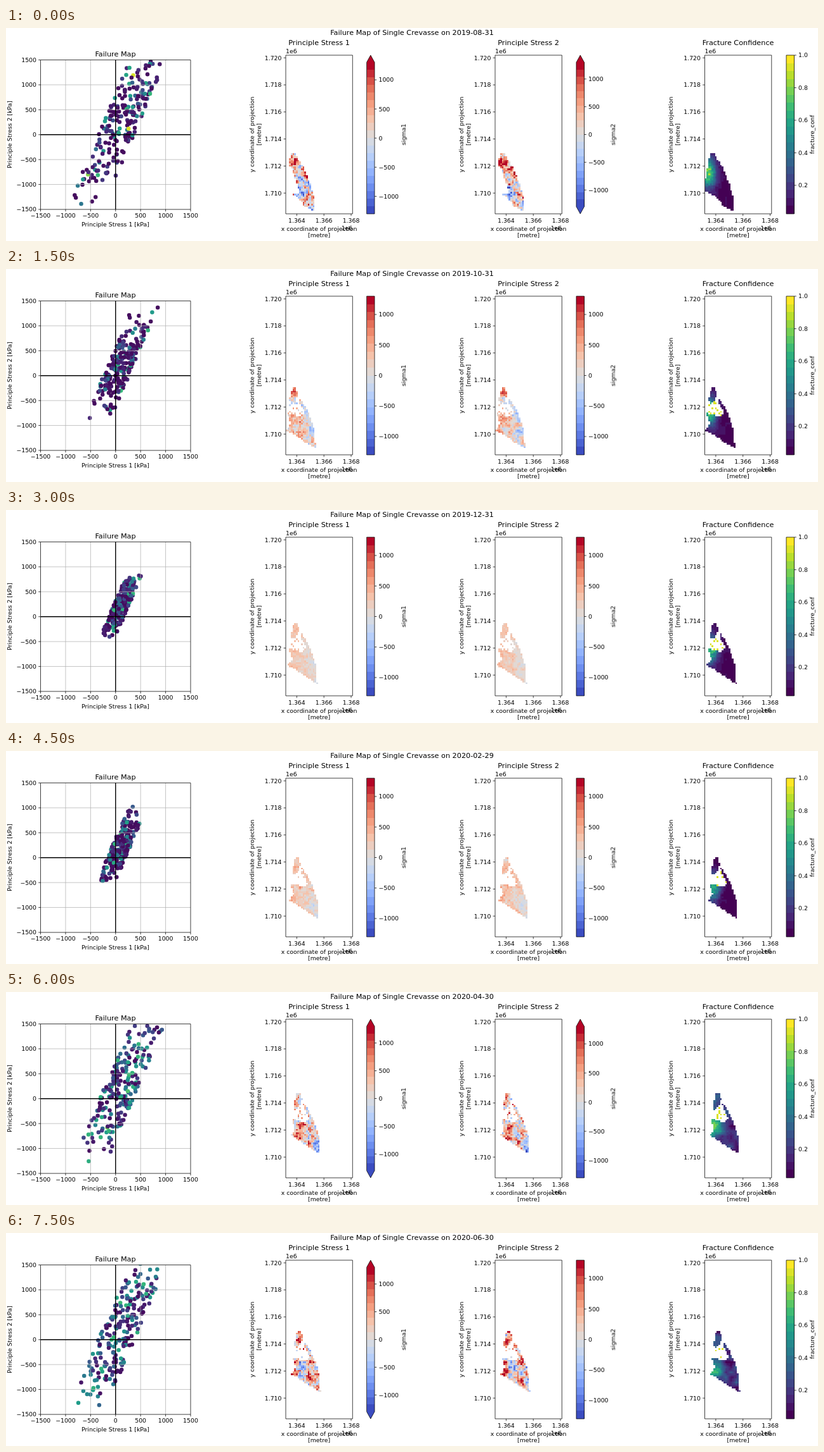
These frames come from a looping animation (1280x337 px, 8000 ms). An HTML page:

```html
<!DOCTYPE html>
<html lang="en">
<head>
<meta charset="utf-8">
<title>Failure map</title>
<style>
  html, body { margin: 0; width: 100%; height: 100%; overflow: hidden; background: #fff; }
  svg { display: block; width: 1280px; height: 337px; font: 9.33px "DejaVu Sans", sans-serif; }
  .title { font-size: 11.22px; }
  .line { fill: none; stroke: #000; stroke-width: .75; }
  .grid { stroke: #b0b0b0; stroke-width: .75; }
  .zero { stroke: #000; stroke-width: 1.4; }
  .cells { shape-rendering: crispEdges; }
  .month { opacity: 0; animation: show 8s step-end infinite; }
  .month:last-child { animation-name: showLast; }
  @keyframes show { 0% { opacity: 1; } 9.375%, 100% { opacity: 0; } }
  @keyframes showLast { 0% { opacity: 1; } 6.25%, 100% { opacity: 0; } }
</style>
</head>
<body>
<svg viewBox="0 0 1280 337">
  <defs><clipPath id="plot"><rect x="54.5" y="50.5" width="236.5" height="236.5"/></clipPath></defs>
  <g id="months"></g>
  <g id="axes"></g>
</svg>
<script>
const COOLWARM = ['3b4cc0', '6282ea', '8db0fe', 'b8d0f9', 'dddddd', 'f5c4ad', 'f49a7b', 'de604d', 'b40426'];
const VIRIDIS = ['440154', '482878', '3e4989', '31688e', '26828e', '1f9e89', '35b779', '6ece58', 'b5de2b', 'fde725'];
const TOP = 43, BOTTOM = 294, LIMIT = 1300, CONF_MIN = .025, CELL = 2.67, LEVELS = 20;
const PANELS = [441, 771, 1101.5];

const clamp = (v, lo = 0, hi = 1) => Math.min(hi, Math.max(lo, v));
const mix = (a, b, t) => a + (b - a) * t;
const minus = v => String(v).replace('-', '−');

function ramp(stops, t) {
  const p = clamp(t) * (stops.length - 1), i = Math.min(stops.length - 2, Math.floor(p));
  const channel = (hex, c) => parseInt(hex.substr(c * 2, 2), 16);
  return `rgb(${[0, 1, 2].map(c => Math.round(mix(channel(stops[i], c), channel(stops[i + 1], c), p - i)))})`;
}
const stepped = (stops, t) => ramp(stops, clamp(Math.floor(t * LEVELS), 0, LEVELS - 1) / (LEVELS - 1));

// Drawing helpers
const text = (s, x, y, anchor = 'middle', extra = '') =>
  `<text x="${x}" y="${y}" text-anchor="${anchor}" ${extra}>${s}</text>`;
const title = (s, x, y) => text(s, x, y, 'middle', 'class="title"');
const upright = (s, x, y = 168.5) => text(s, 0, 0, 'middle', `transform="translate(${x} ${y}) rotate(-90)"`);
const path = (d, cls = 'line') => `<path class="${cls}" d="${d}"/>`;
const rect = (x, y, w, h, fill) =>
  `<rect x="${x.toFixed(2)}" y="${y.toFixed(2)}" width="${w.toFixed(2)}" height="${h.toFixed(2)}" fill="${fill}"/>`;
const frame = (x, y, w, h) => path(`M${x} ${y}h${w}v${h}h${-w}z`);

// Seeded noise
const hash = (x, y, seed) => {
  const s = Math.sin(x * 127.1 + y * 311.7 + seed * 74.7) * 43758.5453;
  return s - Math.floor(s);
};
function smooth(x, y, seed) {
  const i = Math.floor(x), j = Math.floor(y), u = x - i, v = y - j;
  return 2 * mix(mix(hash(i, j, seed), hash(i + 1, j, seed), u),
                 mix(hash(i, j + 1, seed), hash(i + 1, j + 1, seed), u), v) - 1;
}

// Ice outlines relative to its top, as x, y pairs
const WHOLE = [0,0, 6,0, 13,13, 21,25, 30,48, 37,70, 38,92, 24,87, 8,69, -8,61, -8,48, -3,18];
const LUMP = [0,0, 6,0, 9,10, 4,22, -3,27, -4,18];
const BODY = [10,14, 20,28, 28,45, 35,68, 37,96, 20,86, 0,72, -10,67, -2,57, -8,40, 14,46, 20,39, 12,25];
const GAP = [4,10, 12,24, 20,38, 14,46, -8,40, -3,18];

function inside(poly, x, y) {
  let hit = false;
  for (let i = 0, j = poly.length - 2; i < poly.length; j = i, i += 2) {
    const [ax, ay, bx, by] = [poly[i], poly[i + 1], poly[j], poly[j + 1]];
    if ((ay > y) !== (by > y) && x < ax + (bx - ax) * (y - ay) / (by - ay)) hit = !hit;
  }
  return hit;
}

// Stress is calm in midwinter and strong in summer; the ice drifts upwards.
function monthState(i) {
  return {
    i,
    active: Math.min(1, .2 + .06 * (i - 4.6) ** 2),
    late: clamp((i - 6) / 2),
    x: Math.min(459, 449 + 1.15 * i),
    y: Math.max(156, 197 - 4.6 * i)
  };
}

function scatter({ i, active, late }) {
  let out = '';
  for (let n = 0; n < 225; n++) {
    const r = k => hash(n, k, i);
    const y = 230 + (380 + 1300 * active) * (r(1) + r(5) - 1);
    const x = 15 + .42 * y + (100 + 260 * active) * (2 * r(2) - 1);
    const conf = .03 + .65 * r(3) ** mix(4.5, 1.8, late) + (r(4) > .985 ? .4 : 0);
    out += `<circle cx="${(172.75 + x * .07883).toFixed(1)}" cy="${(168.75 - y * .07883).toFixed(1)}" r="3.25" fill="${ramp(VIRIDIS, conf)}"/>`;
  }
  return `<g clip-path="url(#plot)">${out}</g>`;
}

function stressColor({ i, active }, panel, x, y, u) {
  const wave = .9 * smooth(x / 2.6, y / 2.6, i + 20) + .45 * smooth(x / 2, y / 2, i + 30 + panel * 9);
  const grain = .5 * (2 * hash(x, y, i + 40 + panel) - 1);
  const sigma = 220 + 150 * (13 - u) / 20 + 1150 * active ** 1.2 * (wave + grain);
  return stepped(COOLWARM, (sigma + LIMIT) / (2 * LIMIT));
}

function confColor({ i, late }, x, y, u, v, loose) {
  const d = ((u + 2) / 11) ** 2 + ((v - 32 - 2.4 * i) / 22) ** 2;
  const rest = mix(.05, .2, late) * (1 + .9 * smooth(x / 3, y / 3, i + 60));
  const conf = loose ? .95 : rest + mix(.78, .4, i / 10) * Math.exp(-d) * (.85 + .3 * hash(x, y, i + 70));
  return stepped(VIRIDIS, (conf - CONF_MIN) / (1 - CONF_MIN));
}

function heatmaps(m) {
  let out = '';
  for (let x = 0; x < 24; x++) for (let y = 40; y < 94; y++) {
    const u = (x + .5) * CELL + PANELS[0] - m.x, v = (y + .5) * CELL + TOP - m.y;
    const solid = m.i ? inside(LUMP, u, v) || inside(BODY, u, v) : inside(WHOLE, u, v);
    const loose = !solid && m.i > 0 && inside(GAP, u, v) && hash(x, y, m.i + 5) > .88;
    if (!solid && !loose) continue;
    // At first the western flank has confidence but no stress.
    const bare = m.i === 0 && v > 22 && v < 66 && u < (v - 20) * .33;
    PANELS.forEach((left, panel) => {
      if (panel < 2 && bare) return;
      const fill = panel < 2 ? stressColor(m, panel, x, y, u) : confColor(m, x, y, u, v, loose);
      out += rect(left + x * CELL, TOP + y * CELL, CELL, CELL, fill);
    });
  }
  return `<g class="cells">${out}</g>`;
}

function colorbar(x, stops, lo, hi, ticks, extend = '') {
  const w = 12.5, up = /max|both/.test(extend), down = /min|both/.test(extend);
  const top = TOP + (up ? 11.4 : 0), bottom = BOTTOM - (down ? 11.4 : 0), h = (bottom - top) / LEVELS;
  let out = '<g class="cells">';
  for (let n = 0; n < LEVELS; n++) out += rect(x, bottom - (n + 1) * h, w, h, ramp(stops, n / (LEVELS - 1)));
  out += '</g>';
  const tip = (base, end, color) => `<path d="M${x} ${base}L${x + w / 2} ${end}L${x + w} ${base}z" fill="${color}"/>`;
  if (up) out += tip(top, TOP, ramp(stops, 1));
  if (down) out += tip(bottom, BOTTOM, ramp(stops, 0));
  out += path(`M${x} ${bottom}V${top}${up ? `L${x + w / 2} ${TOP}` : ''}L${x + w} ${top}V${bottom}` +
              `${down ? `L${x + w / 2} ${BOTTOM}` : ''}z`);
  for (const t of ticks) {
    const y = mix(bottom, top, (t - lo) / (hi - lo));
    out += path(`M${x + w} ${y}h3.3`) + text(minus(hi === 1 ? t.toFixed(1) : t), x + w + 6.5, y + 3.4, 'start');
  }
  return out;
}

// Colour bars with arrow ends, by month
const EXTENDS = { 0: ['max', 'both'], 8: ['both', 'max'], 9: ['min'], 10: ['both'] };

function month(i) {
  const m = monthState(i), [ext1, ext2] = EXTENDS[i] || [];
  const date = new Date(Date.UTC(2019, 8 + i, 0)).toISOString().slice(0, 10);
  const stress = [-1000, -500, 0, 500, 1000];
  return `<g class="month" style="animation-delay:${i * 750 - 8000}ms">` +
    title(`Failure Map of Single Crevasse on ${date}`, 640, 10.8) +
    scatter(m) + heatmaps(m) +
    colorbar(568.5, COOLWARM, -LIMIT, LIMIT, stress, ext1) +
    colorbar(899, COOLWARM, -LIMIT, LIMIT, stress, ext2) +
    colorbar(1230, VIRIDIS, CONF_MIN, 1, [.2, .4, .6, .8, 1]) + '</g>';
}

function scatterAxes() {
  let out = '';
  for (let v = -1500; v <= 1500; v += 500) {
    const x = 172.75 + v * .07883, y = 168.75 - v * .07883;
    if (v && Math.abs(v) < 1500) out += path(`M${x} 50.5V287M54.5 ${y}H291`, 'grid');
    out += path(`M${x} 287v3.3M54.5 ${y}h-3.3`) +
      text(minus(v), x, 300.4) + text(minus(v), 48, y + 3.4, 'end');
  }
  return out + path('M172.75 50.5V287M54.5 168.75H291', 'zero') + frame(54.5, 50.5, 236.5, 236.5) +
    title('Failure Map', 172.5, 45) +
    text('Principle Stress 1 [kPa]', 172.5, 313.6) + upright('Principle Stress 2 [kPa]', 9.3);
}

function mapAxes(left, name) {
  let out = frame(left, TOP, 105.3, BOTTOM - TOP);
  for (let n = 0; n < 3; n++) {
    const x = left + 17.4 + n * 42.8;
    out += path(`M${x} ${BOTTOM}v3.3`) + text((1.364 + n * .002).toFixed(3), x, 307.5);
  }
  for (let n = 0; n < 6; n++) {
    const y = 47.2 + n * 42.8;
    out += path(`M${left} ${y}h-3.3`) + text((1.72 - n * .002).toFixed(3), left - 6.5, y + 3.4, 'end');
  }
  const mid = left + 52.6;
  return out + title(name, mid, 27) + text('1e6', left, 39.8, 'start') + text('1e6', left + 105.3, 319.8, 'end') +
    text('x coordinate of projection', mid, 320.7) + text('[metre]', mid, 331.4) +
    upright('y coordinate of projection', left - 50.2) + upright('[metre]', left - 39.2);
}

document.getElementById('months').innerHTML = Array.from({ length: 11 }, (_, i) => month(i)).join('');
document.getElementById('axes').innerHTML = scatterAxes() +
  ['Principle Stress 1', 'Principle Stress 2', 'Fracture Confidence'].map((name, i) => mapAxes(PANELS[i], name)).join('') +
  upright('sigma1', 630) + upright('sigma2', 960.2) + upright('fracture_conf', 1274.2);
</script>
</body>
</html>
```
